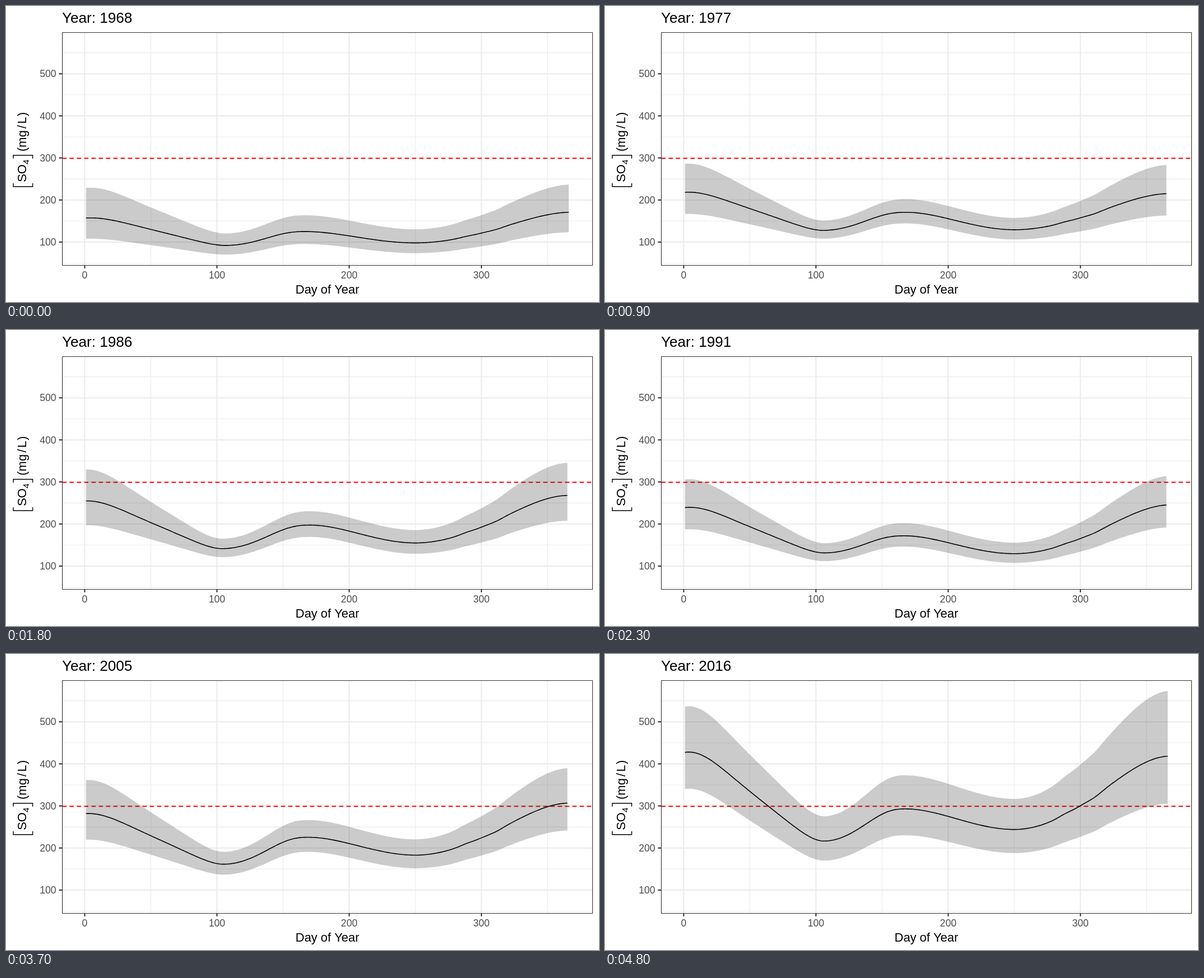
An HTML page with a canvas for the animation above (4.9 s loop, 1058 px wide and 529 px high).

```html
<!DOCTYPE html>
<html lang="en">
<head>
<meta charset="utf-8">
<title>Sulfate by day of year</title>
<style>
  html, body { margin: 0; width: 100%; height: 100%; overflow: hidden; background: #fff; }
  canvas { display: block; width: 100%; height: 100%; }
</style>
</head>
<body>
<canvas id="stage" width="1058" height="529"></canvas>
<script>
const ctx = document.getElementById('stage').getContext('2d');
const FONT = '"Liberation Sans", Arial, sans-serif';
const FIRST_YEAR = 1968, YEARS = 49, STEP = 100;
const PANEL = { l: 100.5, t: 47.5, r: 1046.5, b: 463.5 };

const px = day => 140.4 + day * 2.3594;
const py = mg => 421.9 - (mg - 100) * 0.7518;
const mix = (a, b, t) => a + (b - a) * t;
const bell = (x, centre, width) => Math.exp(-(((x - centre) / width) ** 2));

// Key years. level: winter peak, spring low, summer peak, autumn low, winter peak.
// spread: log half-width of the band at the start, its narrowest and the end.
// lag: days by which the season runs late.
const KEYS = [
  { year: 1968, lag: 1.5, level: [157.5, 92, 125, 98, 171], spread: [0.376, 0.27, 0.326] },
  { year: 1977, lag: 0.5, level: [219, 128, 171, 129.5, 215.5], spread: [0.27, 0.168, 0.276] },
  { year: 1986, lag: -1, level: [255, 141.5, 197.5, 155, 268], spread: [0.257, 0.154, 0.254] },
  { year: 1997, lag: 4.5, level: [309.5, 167, 202.5, 145, 308], spread: [0.232, 0.171, 0.238] },
  { year: 2005, lag: 0, level: [282, 161.5, 225.5, 183, 307], spread: [0.249, 0.167, 0.239] },
  { year: 2010, lag: -3, level: [404, 241, 360.5, 288.5, 425], spread: [0.209, 0.179, 0.204] },
  { year: 2016, lag: 1, level: [428, 216.5, 293, 244, 418.5], spread: [0.227, 0.241, 0.315] }
];

// Smoothstep whose later part is held back (skew < 0) or hurried (skew > 0).
const ease = (t, skew) => t * t * (3 - 2 * t) + 16 * skew * t ** 4 * (1 - t) ** 2;
const SKEWS = [-0.33, 0.15, 0, 0];

// Eased path through the turning points of the year.
function season(day, turns, values) {
  let i = 0;
  while (i < turns.length - 2 && day > turns[i + 1]) i++;
  const t = (day - turns[i]) / (turns[i + 1] - turns[i]);
  return mix(values[i], values[i + 1], ease(t, SKEWS[i]));
}

function curvesFor(year) {
  let k = 0;
  while (k < KEYS.length - 2 && year > KEYS[k + 1].year) k++;
  const a = KEYS[k], b = KEYS[k + 1];
  const t = (year - a.year) / (b.year - a.year);
  const lag = mix(a.lag, b.lag, t);
  const dip = 0.2 * bell(year, 1981, 1.8) + 0.15 * bell(year, 1991, 2);
  const levels = a.level.map((v, i) => mix(Math.log(v), Math.log(b.level[i]), t) - dip);
  const [start, low, end] = a.spread.map((v, i) => mix(v, b.spread[i], t));
  const spreads = [start, low, low, mix(low, end, 0.27), end];
  const turns = [3 + lag, 105 + lag, 169 - 1.5 * lag, 250, 367 + lag];

  return Array.from({ length: year % 4 ? 365 : 366 }, (_, i) => {
    const day = i + 1;
    const ripple = 0.009 * (bell(day, 288, 7) - bell(day, 311, 7));
    const level = season(day, turns, levels) + ripple;
    const half = season(day, turns, spreads);
    return {
      x: px(day),
      y: py(Math.exp(level)),
      hi: py(Math.exp(level + half)),
      lo: py(Math.exp(level - half))
    };
  });
}

const SERIES = Array.from({ length: YEARS }, (_, i) => curvesFor(FIRST_YEAR + i));

function line(x1, y1, x2, y2, color, width) {
  ctx.strokeStyle = color;
  ctx.lineWidth = width;
  ctx.beginPath();
  ctx.moveTo(x1, y1);
  ctx.lineTo(x2, y2);
  ctx.stroke();
}

function text(str, x, y, size, align = 'left', color = '#000') {
  ctx.font = `${size}px ${FONT}`;
  ctx.textAlign = align;
  ctx.fillStyle = color;
  ctx.fillText(str, x, y);
}

const vLine = (day, w) => line(px(day), PANEL.t, px(day), PANEL.b, '#ebebeb', w);
const hLine = (mg, w) => line(PANEL.l, py(mg), PANEL.r, py(mg), '#ebebeb', w);

function drawGrid() {
  for (let mg = 50; mg <= 550; mg += 100) hLine(mg, 1.1);
  for (let day = 50; day <= 350; day += 100) vLine(day, 1.1);
  for (let mg = 100; mg <= 500; mg += 100) hLine(mg, 2.1);
  for (let day = 0; day <= 300; day += 100) vLine(day, 2.1);
}

function drawLimit() {
  ctx.setLineDash([7.5, 5.5]);
  line(PANEL.l, 272.3, PANEL.r, 272.3, '#f00', 2);
  ctx.setLineDash([]);
}

function drawSeries(points) {
  ctx.fillStyle = 'rgba(51, 51, 51, 0.25)';
  ctx.beginPath();
  points.forEach(p => ctx.lineTo(p.x, p.hi));
  [...points].reverse().forEach(p => ctx.lineTo(p.x, p.lo));
  ctx.fill();

  ctx.strokeStyle = '#000';
  ctx.lineWidth = 1.6;
  ctx.lineJoin = 'round';
  ctx.beginPath();
  points.forEach(p => ctx.lineTo(p.x, p.y));
  ctx.stroke();
}

function bracket(x, foot) {
  ctx.strokeStyle = '#000';
  ctx.lineWidth = 1.4;
  ctx.lineJoin = 'miter';
  ctx.beginPath();
  ctx.moveTo(x + foot, -23.3);
  ctx.lineTo(x, -23.3);
  ctx.lineTo(x, 11.3);
  ctx.lineTo(x + foot, 11.3);
  ctx.stroke();
}

function drawAxes() {
  ctx.strokeStyle = '#333';
  ctx.lineWidth = 1.1;
  ctx.strokeRect(PANEL.l, PANEL.t, PANEL.r - PANEL.l, PANEL.b - PANEL.t);
  for (let mg = 100; mg <= 500; mg += 100) {
    line(94.5, py(mg), PANEL.l, py(mg), '#333', 2.1);
    text(mg, 89.5, py(mg) + 6.2, 17.6, 'right', '#4d4d4d');
  }
  for (let day = 0; day <= 300; day += 100) {
    line(px(day), PANEL.b, px(day), PANEL.b + 5.3, '#333', 2.1);
    text(day, px(day), 486.6, 17.6, 'center', '#4d4d4d');
  }
  text('Day of Year', 573.4, 513.6, 21.9, 'center');

  ctx.save();
  ctx.translate(36.3, 325);
  ctx.rotate(-Math.PI / 2);
  bracket(2.2, 6);
  text('SO', 10.2, 0, 22);
  text('4', 42, 4.6, 15.4);
  bracket(58.2, -6);
  text('(mg', 65, 0, 22);
  text('/', 106, 0, 22);
  text('L', 114.5, 0, 22);
  text(')', 128, 0, 22);
  ctx.restore();
}

function draw(now) {
  const i = Math.floor(now / STEP) % YEARS;
  ctx.fillStyle = '#fff';
  ctx.fillRect(0, 0, 1058, 529);
  drawGrid();
  drawLimit();
  drawSeries(SERIES[i]);
  drawAxes();
  text(`Year: ${FIRST_YEAR + i}`, 100, 30.4, 26.1);
}

const start = performance.now();
function tick() {
  draw(performance.now() - start);
  requestAnimationFrame(tick);
}
tick();
</script>
</body>
</html>
```
